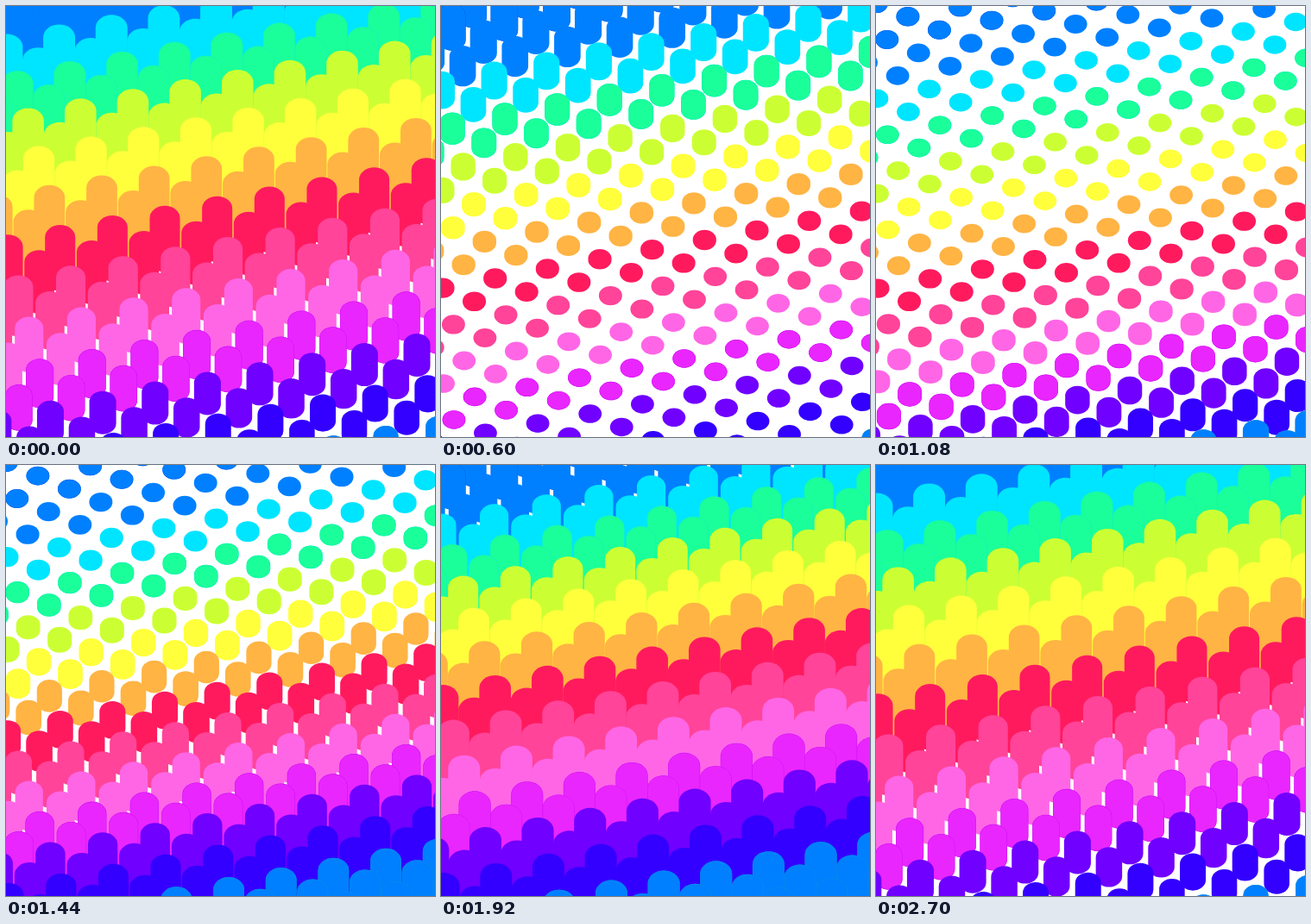
Recreate the animation shown at these times as an HTML page with a canvas. Size 497 by 500 pixels, loop 2730 ms.

```html
<!DOCTYPE html>
<html>
<head>
<meta charset="utf-8">
<style>
  html, body { margin: 0; width: 100%; height: 100%; overflow: hidden; background: #fff; }
  canvas { display: block; }
</style>
</head>
<body>
<canvas id="stage" width="497" height="500"></canvas>
<script>
const ctx = document.getElementById('stage').getContext('2d');
const LOOP = 2730, STEP = 30, CYCLE = 2700;

// Fill and optional rim colour for each pair of rows, top to bottom
const COLORS = [
  ['#0080ff', '#0060f0'], ['#0080ff'], ['#00e5ff'], ['#1aff99', '#12f0c0'],
  ['#ccff33'], ['#ffff3c'], ['#ffb444'], ['#ff1a5e'], ['#ff4499'], ['#ff66e6'],
  ['#ea26ff', '#cc10f4'], ['#7000ff'], ['#3300ff'], ['#0080ff', '#0a8ce0'],
];

// Lattice: steps along a row and from one row to the next
const ORIGIN = [36.9, 12.6], ALONG = [60.65, -11.12], DOWN = [36.5, 15.37];

const smooth = p => p * p * (3 - 2 * p);

function pillar(x, y, s, [fill, rim]) {
  const rx = 13.4 + 5.1 * s, ry = 10.8 + 4.1 * s, lift = 60.3 * s;
  ctx.beginPath();
  ctx.ellipse(x, y, rx, ry, 0, 0, Math.PI);
  ctx.ellipse(x, y - lift, rx, ry, 0, Math.PI, 2 * Math.PI);
  ctx.closePath();
  ctx.fillStyle = fill;
  ctx.fill();
  if (rim) {
    ctx.save();
    ctx.clip();
    ctx.strokeStyle = rim;
    ctx.stroke();
    ctx.restore();
  }
}

function draw(now) {
  const time = Math.floor(now % LOOP / STEP) * STEP;
  ctx.fillStyle = '#fff';
  ctx.fillRect(0, 0, 497, 500);
  for (let row = -3; row < 32; row++) {
    const degrees = 88.5 + 4.05 * (row - 20) + 360 * time / CYCLE;
    const s = smooth(0.5 + 0.5 * Math.cos(degrees * Math.PI / 180));
    const pair = Math.max(0, Math.min(COLORS.length - 1, Math.floor(row / 2)));
    const x0 = ORIGIN[0] + row * DOWN[0], y0 = ORIGIN[1] + row * DOWN[1];
    const first = Math.floor((-20 - x0) / ALONG[0]);
    for (let i = first; i < first + 11; i++) {
      pillar(x0 + i * ALONG[0], y0 + i * ALONG[1], s, COLORS[pair]);
    }
  }
}

function tick() {
  draw(performance.now());
  requestAnimationFrame(tick);
}
tick();
</script>
</body>
</html>
```
